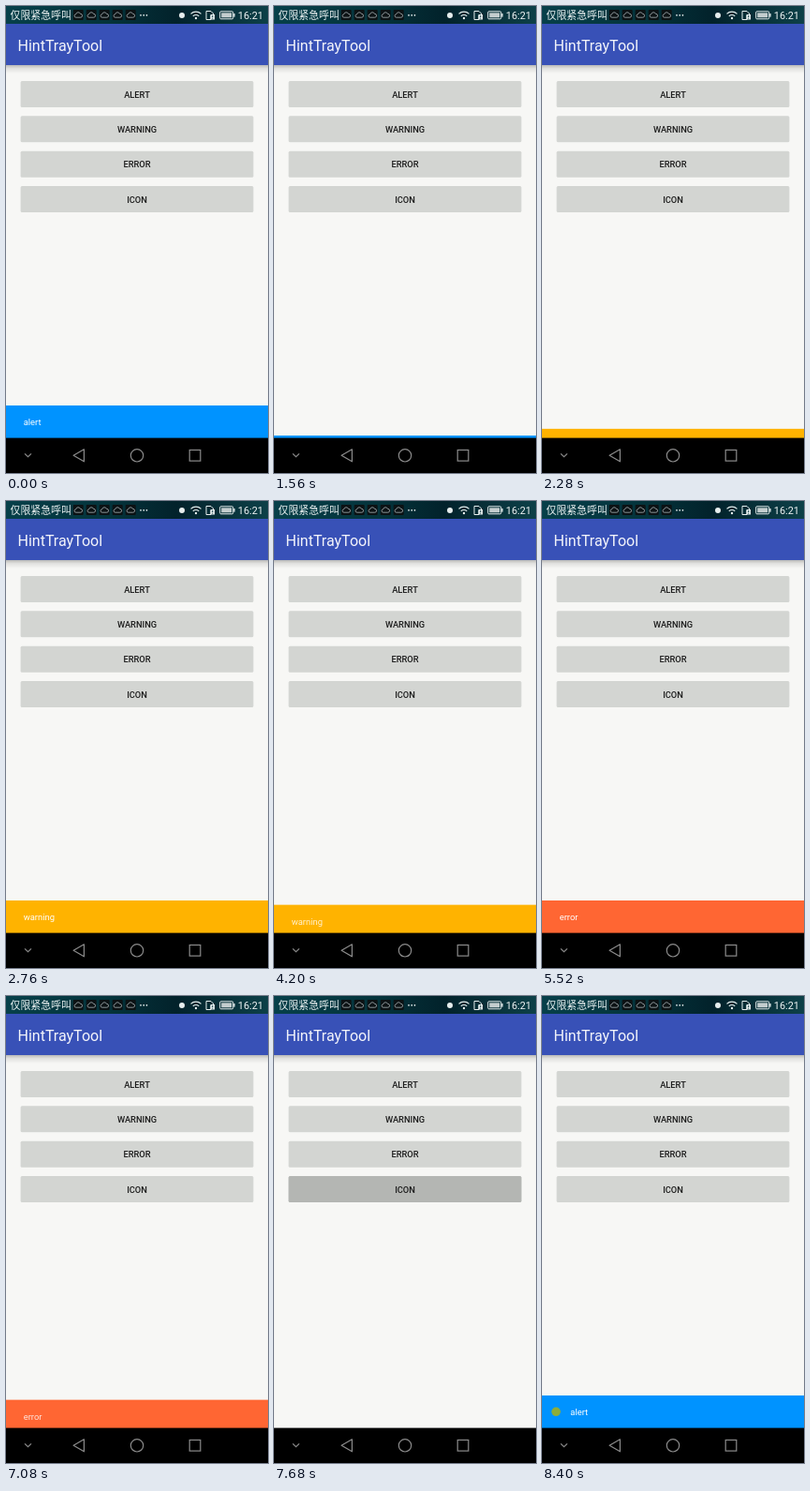
Write an HTML page that moves like this. It is 280 px wide and 498 px high and loops after 8.52 s.

```html
<!DOCTYPE html>
<html lang="en">
<head>
<meta charset="utf-8">
<title>Snack bars</title>
<style>
  html, body { margin: 0; width: 100%; height: 100%; overflow: hidden; background: #f7f7f5; }
  svg { display: block; width: 100vw; height: 100vh; font-family: Roboto, sans-serif; }
  .label { font-size: 9.3px; font-weight: 500; fill: #1c1c1c; text-anchor: middle; }
  .snack { font-size: 9.4px; fill: #fff; }
  .status { font-size: 10.9px; fill: #f0f4f4; }
  .line { fill: none; stroke: #8c8c8c; stroke-width: 1.2; }
</style>
</head>
<body>
<svg viewBox="0 0 280 498">
  <defs>
    <linearGradient id="statusFill">
      <stop offset="0" stop-color="#06404a"/>
      <stop offset=".4" stop-color="#04333b"/>
      <stop offset=".65" stop-color="#02222b"/>
      <stop offset="1" stop-color="#0d4048"/>
    </linearGradient>
    <linearGradient id="shade" x2="0" y2="1">
      <stop offset="0" stop-color="#000" stop-opacity=".25"/>
      <stop offset=".4" stop-color="#000" stop-opacity=".09"/>
      <stop offset="1" stop-color="#000" stop-opacity="0"/>
    </linearGradient>
    <g id="cloud">
      <rect width="11" height="11" rx="1" fill="#0c1214"/>
      <path d="M3.2 8.2a1.7 1.7 0 0 1-.2-3.4 2.5 2.5 0 0 1 4.8-.4 1.9 1.9 0 0 1 .3 3.8z"
            fill="none" stroke="#a9b3b5" stroke-width=".8"/>
    </g>
  </defs>

  <rect width="280" height="498" fill="#f7f7f5"/>
  <rect y="63" width="280" height="9" fill="url(#shade)"/>
  <rect y="19" width="280" height="44" fill="#3851b7"/>
  <text x="12.5" y="47.5" font-size="16" fill="#f4f5fb">HintTrayTool</text>

  <rect width="280" height="19" fill="url(#statusFill)"/>
  <text class="status" x="4.5" y="13.7" style="font-family:'Noto Sans CJK SC','Noto Sans CJK',sans-serif">仅限紧急呼叫</text>
  <g id="clouds"></g>
  <g fill="#e6eded">
    <circle cx="144" cy="9.8" r=".9"/>
    <circle cx="147.2" cy="9.8" r=".9"/>
    <circle cx="150.4" cy="9.8" r=".9"/>
    <circle cx="188" cy="10" r="3"/>
    <circle cx="203" cy="13" r="1.2"/>
    <path d="M214 5.5h5l2.5 2.5v2h-2.5v4.5h-5z" fill="none" stroke="#e6eded"/>
    <rect x="218.5" y="9" width="4.5" height="5.5"/>
    <path d="M220.75 10v2m0 .7v1" stroke="#153f46"/>
    <rect x="228.7" y="5.8" width="14" height="8" rx="1" fill="none" stroke="#e6eded"/>
    <rect x="230.2" y="7.3" width="11" height="5" fill="#c3cdce"/>
    <rect x="243.2" y="8" width="1.4" height="3.6"/>
  </g>
  <path d="M197.5 8.4a8 8 0 0 1 11 0M199.8 10.9a4.7 4.7 0 0 1 6.4 0" fill="none" stroke="#e6eded" stroke-width="1.2"/>
  <text class="status" x="247.8" y="13.8">16:21</text>

  <g id="buttons"></g>

  <g id="bar">
    <rect id="barFill" y="426" width="280" height="35"/>
    <g id="content">
      <circle id="dot" cx="15" cy="443.3" r="4.8" fill="#8fad38"/>
      <text id="message" class="snack" y="447"></text>
    </g>
  </g>

  <rect y="460.6" width="280" height="37.4" fill="#000"/>
  <g class="line">
    <path d="M20 477.4l3.5 3.3 3.5-3.3"/>
    <path d="M83.4 472.8v13l-11.3-6.5z" stroke-linejoin="round"/>
    <circle cx="140" cy="479.3" r="6.7"/>
    <rect x="196.2" y="473.5" width="11.6" height="11.6"/>
  </g>
</svg>
<script>
const LOOP = 8520, STEP = 120, BAR_HEIGHT = 34.6;
const SLIDE = 250, FADE = 180;

const snacks = [
  { text: 'alert', color: '#0093ff', show: -1000, hide: 1390 },
  { text: 'warning', color: '#ffb300', show: 2213, hide: 4150 },
  { text: 'error', color: '#ff6633', show: 4990, hide: 7030 },
  { text: 'alert', color: '#0093ff', show: 7980, hide: Infinity, icon: true }
];

const buttons = [
  { text: 'ALERT' },
  { text: 'WARNING', down: 1720, up: 2230 },
  { text: 'ERROR', down: 4480, up: 4990 },
  { text: 'ICON', down: 7480, up: 7970 }
];

const byId = id => document.getElementById(id);
const clamp = x => Math.min(1, Math.max(0, x));
const smooth = x => (1 - Math.cos(Math.PI * clamp(x))) / 2;

// cubic-bezier(.4, 0, .2, 1), solved by bisection
function fastOutSlowIn(x) {
  x = clamp(x);
  let low = 0, high = 1;
  for (let i = 0; i < 20; i++) {
    const s = (low + high) / 2, r = 1 - s;
    if (1.2 * r * r * s + 0.6 * r * s * s + s ** 3 < x) low = s; else high = s;
  }
  return 3 * (1 - low) * low * low + low ** 3;
}

byId('clouds').innerHTML = [0, 1, 2, 3, 4]
  .map(i => `<use href="#cloud" x="${71.7 + i * 14}" y="4"/>`).join('');

byId('buttons').innerHTML = buttons.map(({ text }, i) => {
  const y = 80 + i * 37.33;
  const face = `x="15.6" y="${y}" width="248.8" height="28" rx="1.5"`;
  return `<rect ${face} fill="#d3d5d2"/>
    <rect class="press" ${face} fill="#b4b6b3"/>
    <text class="label" x="140" y="${y + 17.8}">${text}</text>`;
}).join('');

const presses = document.querySelectorAll('.press');

function draw(time) {
  buttons.forEach(({ down, up }, i) => {
    const level = down ? Math.min(clamp((time - down) / 200), clamp((up - time) / 200)) : 0;
    presses[i].setAttribute('opacity', level);
  });

  const snack = snacks.find(s => time >= s.show && time < s.hide + SLIDE);
  byId('bar').setAttribute('visibility', snack ? 'visible' : 'hidden');
  if (!snack) return;

  const { text, color, show, hide, icon } = snack;
  const shown = time < hide
    ? fastOutSlowIn((time - show) / SLIDE)
    : 1 - fastOutSlowIn((time - hide) / SLIDE);
  const alpha = time < hide
    ? smooth((time - show - SLIDE + FADE) / FADE)
    : 1 - smooth((time - hide) / FADE);

  byId('bar').setAttribute('transform', `translate(0 ${BAR_HEIGHT * (1 - shown)})`);
  byId('barFill').setAttribute('fill', color);
  byId('content').setAttribute('opacity', alpha);
  byId('dot').setAttribute('opacity', icon ? 1 : 0);
  byId('message').setAttribute('x', icon ? 30.3 : 18.7);
  byId('message').textContent = text;
}

const start = performance.now();
function tick() {
  const time = (performance.now() - start) % LOOP;
  draw(Math.floor(time / STEP) * STEP);
  requestAnimationFrame(tick);
}
tick();
</script>
</body>
</html>
```
